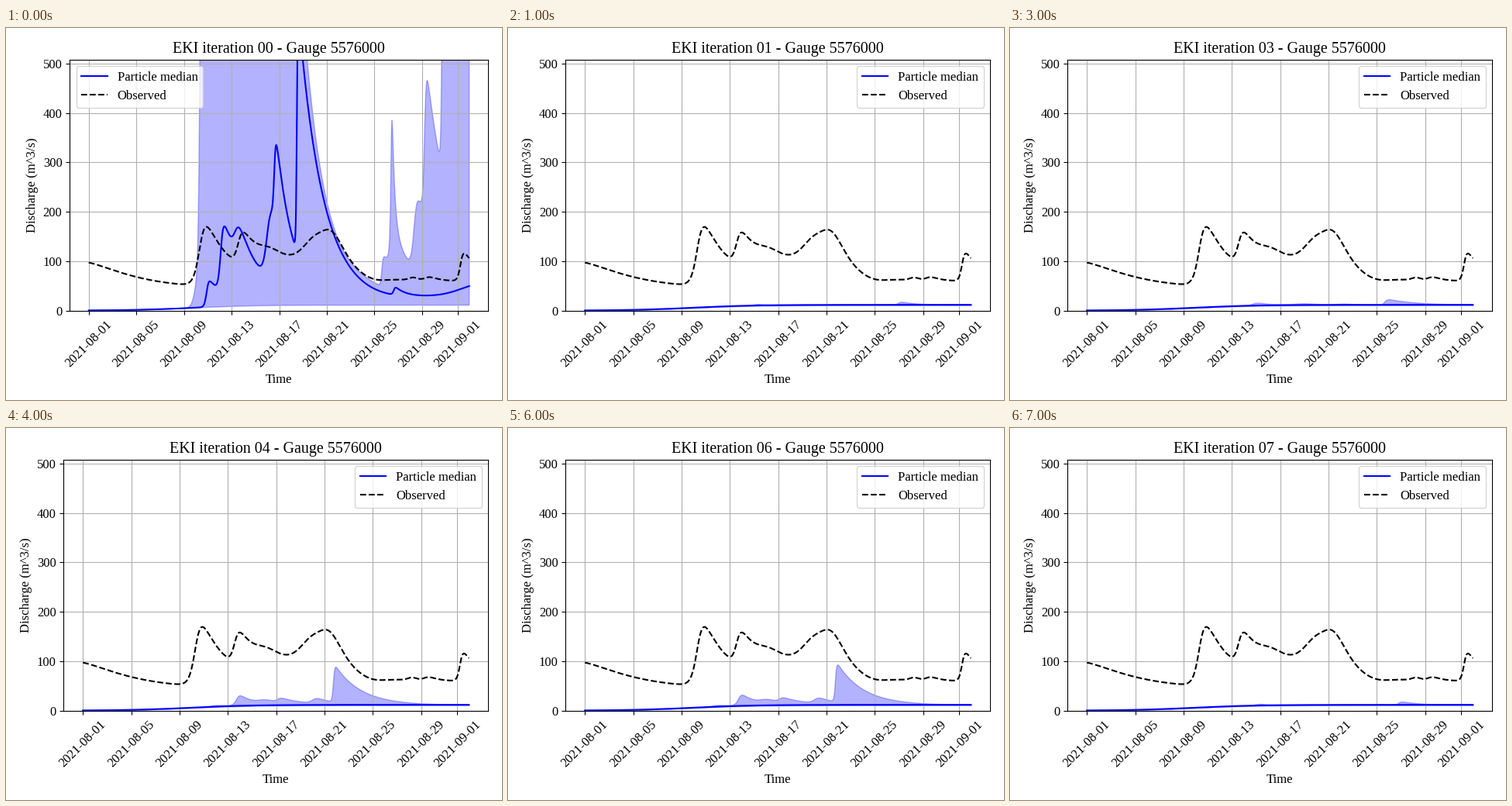
Animation, 640 px wide and 480 px high, one loop 8 s. Source, as a matplotlib script:

```python
import numpy as np
import matplotlib.pyplot as plt
from matplotlib.animation import FuncAnimation

plt.rcParams.update({"font.family": "Liberation Serif", "font.size": 12})

W, H = 640, 480
END = 32 - 1 / 24
t = np.linspace(0, END, 1600)
TICKS = [*range(0, 29, 4), 31]
DATES = [str(np.datetime64("2021-08-01") + d) for d in TICKS]


def logistic(mid, width):
    return 1 / (1 + np.exp((mid - t) / width))


def pulse(day, height, rise, fall):
    """Flood wave: exponential rise and recession with a rounded crest."""
    def wave(u):
        return 1 / (np.exp(-u / rise) + np.exp(u / fall))
    crest = np.log(fall / rise) / (1 / rise + 1 / fall)
    return height * wave(t - day + crest) / wave(crest)


def flow(base, *waves):
    return base + sum(pulse(*w) for w in waves)


calm = 11.7 * logistic(9, 2.6)
calm_low = 0.92 * calm

observed = flow(
    46 + 51 * np.exp(-(t / 4.6) ** 1.3) + 13 * logistic(24.8, 0.5),
    (9.9, 120, .27, 2.4), (13.05, 70, .2, 2.4), (15.5, 33, .7, 2.5),
    (18.8, 55, 1.1, 1), (20.5, 82, .8, 1.5),
    (27.25, 6, .3, .4), (28.65, 7.5, .25, .9), (31.55, 56, .13, 1.6))

first_median = flow(
    calm,
    (10.17, 52, .1, 1.5), (11.42, 137, .12, 2), (12.76, 70, .2, 2.2),
    (15.4, 140, .2, 1.5), (15.79, 165, .07, 1.4), (17.64, 480, .041, 2.2),
    (25.8, 15, .07, .9), (28, 8, 2, 4), (33, 38, 1.8, 2))

# The two tallest waves run far beyond the top of the plot.
first_high = np.minimum(900, flow(
    calm,
    (9.1, 30, .15, 1), (10.13, 39800, .11, 1.85), (23.5, 22, 1.2, 6),
    (24.85, 62, .06, 3), (25.47, 225, .05, .2), (25.6, 75, .1, 1.5),
    (27.75, 150, .14, 3), (28.46, 285, .08, 2), (30.2, 8000, .06, 20)))


def swell(s):
    """Narrow band; a larger s makes its bumps earlier, higher and longer."""
    return flow(calm, (14.3 - .2 * s, 3 + 2.5 * s, .25, .8 + .4 * s),
                (18, 3 * s, .7, 1.2), (21.3, 2 * s, .5, 1.2),
                (26.2 - 1.2 * s, 6 + 5 * s, .12, 1.5 + .9 * s))


def flood(k):
    return calm + k * flow(
        0, (11, 3, .3, 1.5), (13, 20, .15, 1.2), (15.2, 8, .4, 1.5),
        (16.5, 9, .15, 2.5), (19.4, 10, .2, 1.5), (20.92, 71, .06, 2.2))


highs = [first_high, swell(0), swell(.4), swell(1),
         flood(1), flood(1.03), flood(1.06), swell(.1)]

fig = plt.figure(figsize=(W / 100, H / 100), dpi=100)
ax = fig.add_subplot()


def draw(n):
    first = n == 0
    left, right = (82.2 if first else 74.3), 622.2
    ax.clear()
    ax.set_position([left / W, 115.4 / H, (right - left) / W, 324 / H])
    ax.fill_between(t, 0.94 * calm if first else calm_low, highs[n],
                    color="blue", alpha=0.3)
    ax.plot(t, first_median if first else calm, color="blue",
            label="Particle median")
    ax.plot(t, observed, "k--", label="Observed")
    ax.set(xlim=(-END / 20, END * 21 / 20), ylim=(0, 508.6),
           yticks=range(0, 501, 100), xlabel="Time",
           ylabel="Discharge (m^3/s)",
           title=f"EKI iteration {n:02d} - Gauge 5576000")
    ax.set_xticks(TICKS, DATES, rotation=45)
    ax.grid(True)
    ax.legend(loc="upper left" if first else "upper right")
    return []


anim = FuncAnimation(fig, draw, frames=len(highs), init_func=lambda: draw(0),
                     interval=1000, repeat=True, repeat_delay=0)
plt.show()
```
